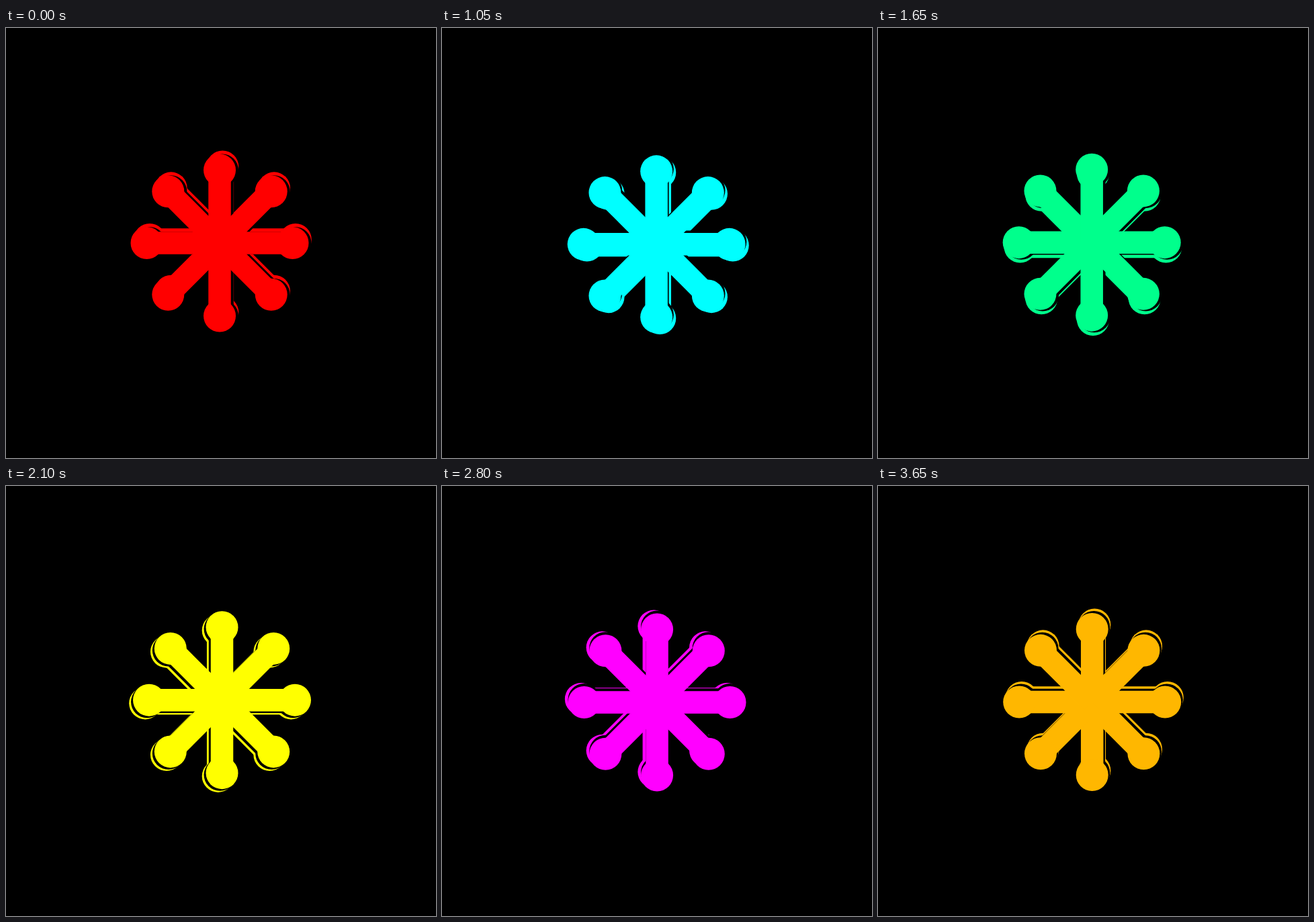
These frames come from a looping animation (640 px wide and 640 px high, 3.7 s). An HTML page:

```html
<!DOCTYPE html>
<html lang="en">
<head>
<meta charset="utf-8">
<title>Spoked star</title>
<style>
  html, body { margin: 0; width: 100%; height: 100%; overflow: hidden; background: #000; }
  svg { display: block; width: 100vw; height: 100vh; }
</style>
</head>
<body>
<svg viewBox="0 0 640 640">
  <defs><g id="star" fill="currentColor" stroke="currentColor"></g></defs>
  <use id="back" href="#star"/>
  <use id="gap" href="#star" color="#000"/>
  <use id="front" href="#star"/>
</svg>
<script>
const LOOP = 3700, STEP = 50;
const CENTER = 320, REACH = 108.5, BALL = 24, ARM = 33.5;
const OUTER = 5.5, INNER = 2;

// time, hue, angle of the back layer, angle of the gap layer
const KEYS = [
  [0, 0, -65, 0],
  [600, 120, -28, -90],
  [1050, 180, 39, -65],
  [1650, 153, 90, 25],
  [2100, 60, 142, 138],
  [2800, -60, 212, 268],
  [3650, 43, 295, 310]
];

const el = id => document.getElementById(id);
const back = el('back'), gap = el('gap'), front = el('front');

let parts = '';
for (let i = 0; i < 8; i++) {
  parts += `<g transform="rotate(${i * 45})">` +
    `<path d="M0 0H${REACH}" stroke-width="${ARM}"/>` +
    `<circle cx="${REACH}" r="${BALL}" stroke="none"/></g>`;
}
el('star').innerHTML = parts;

function slope(i, col) {
  const a = KEYS[Math.max(i - 1, 0)], b = KEYS[Math.min(i + 1, KEYS.length - 1)];
  return (b[col] - a[col]) / (b[0] - a[0]);
}

// Cubic Hermite curve through the keys
function sample(t, col) {
  let i = 0;
  while (i < KEYS.length - 2 && t >= KEYS[i + 1][0]) i++;
  const a = KEYS[i], b = KEYS[i + 1], d = b[0] - a[0];
  const u = (t - a[0]) / d, v = 1 - u;
  return a[col] * v * v * (1 + 2 * u) + b[col] * u * u * (3 - 2 * u) +
    d * u * v * (slope(i, col) * v - slope(i + 1, col) * u);
}

function place(node, radius, degrees) {
  const a = degrees * Math.PI / 180;
  const x = CENTER + radius * Math.cos(a), y = CENTER + radius * Math.sin(a);
  node.setAttribute('transform', `translate(${x.toFixed(2)} ${y.toFixed(2)})`);
}

function draw(t) {
  const color = `hsl(${sample(t, 1)}, 100%, 50%)`;
  const inner = sample(t, 3);
  back.style.color = front.style.color = color;
  place(back, OUTER, sample(t, 2));
  place(gap, INNER, inner);
  place(front, -INNER, inner);
}

const start = performance.now();
function tick() {
  const t = (performance.now() - start) % LOOP;
  draw(Math.floor(t / STEP) * STEP);
  requestAnimationFrame(tick);
}
tick();
</script>
</body>
</html>
```
